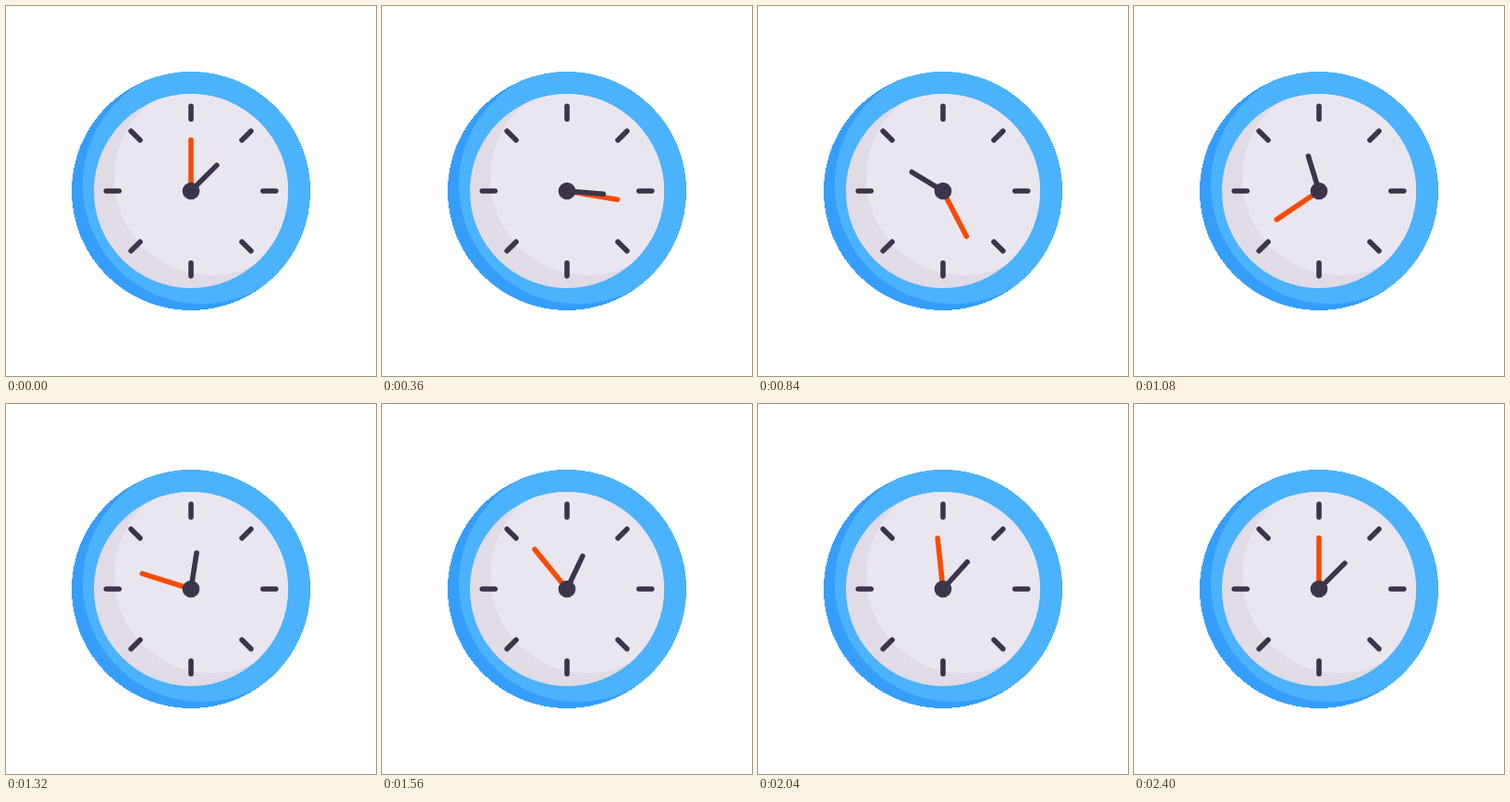
An HTML page that plays this animation: 400x400 px, repeating every 4460 ms.

```html
<!DOCTYPE html>
<html lang="en">
<head>
<meta charset="utf-8">
<title>Clock</title>
<style>
  html, body { margin: 0; height: 100%; overflow: hidden; background: #fff; }
  svg { display: block; width: 100vw; height: 100vh; }
  line { stroke: #3c354a; stroke-width: 5.6; stroke-linecap: round; }
  #minute { stroke: #f84b02; }
</style>
</head>
<body>
<svg viewBox="-200 -200 400 400">
  <clipPath id="rim"><circle r="129" shape-rendering="crispEdges"/></clipPath>
  <clipPath id="face"><circle r="105"/></clipPath>
  <circle r="129" fill="#359efd" shape-rendering="crispEdges"/>
  <g clip-path="url(#rim)"><circle cx="11.5" cy="-6.5" r="128.5" fill="#4bb2fe"/></g>
  <circle r="105" fill="#e0dbe5"/>
  <g clip-path="url(#face)"><circle cx="22" cy="-14" r="105" fill="#eae6ef"/></g>
  <g id="ticks"></g>
  <line id="minute" y2="-55.2"/>
  <line id="hour" y2="-39.4"/>
  <circle r="9.3" fill="#3c354a"/>
</svg>
<script>
const LOOP = 4460, SPIN = 2400, STEP = 30;
const $ = id => document.getElementById(id);

for (let a = 0; a < 360; a += 45)
  $('ticks').innerHTML += `<line y1="-91.7" y2="-77.8" transform="rotate(${a})"/>`;

// cubic-bezier(1/3, 0, 0, 1): solve x(u) = x by bisection, return y(u)
function ease(x) {
  let lo = 0, hi = 1;
  for (let i = 0; i < 30; i++) {
    const u = (lo + hi) / 2;
    if (u * (1 - u) ** 2 + u ** 3 < x) lo = u; else hi = u;
  }
  return lo * lo * (3 - 2 * lo);
}

function turn(id, angle) {
  $(id).setAttribute('transform', `rotate(${angle})`);
}

function draw(now) {
  const t = Math.floor((now % LOOP) / STEP) * STEP;
  const p = t < SPIN ? ease(t / SPIN) : 1;
  turn('minute', 720 * p);
  turn('hour', 45 + 360 * p);
  requestAnimationFrame(draw);
}
draw(0);
</script>
</body>
</html>
```
